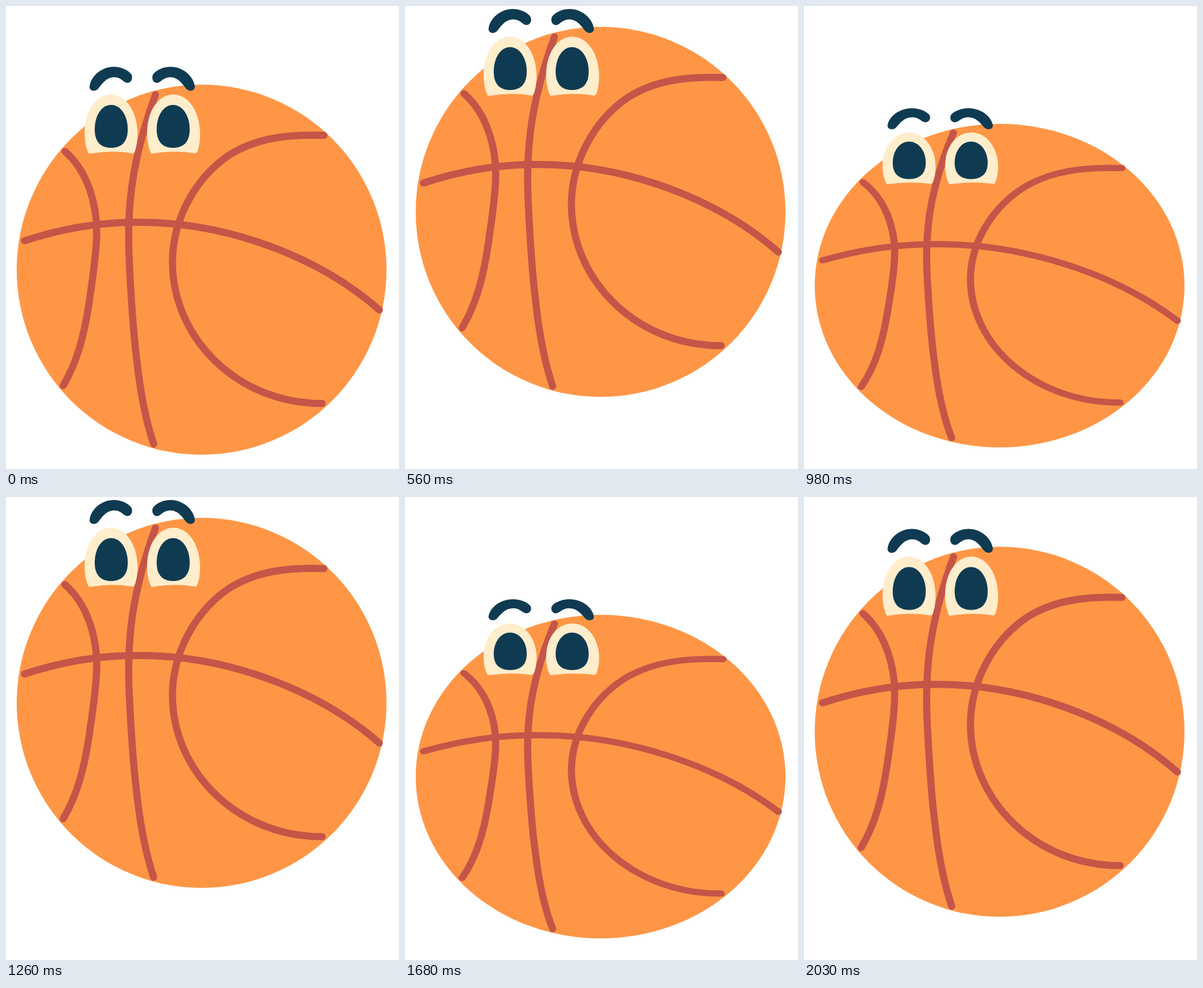
An HTML page that plays this animation: 660 by 777 pixels, repeating every 2100 ms.

```html
<!DOCTYPE html>
<html lang="en">
<head>
<meta charset="utf-8">
<title>Bouncing basketball</title>
<style>
  html, body { margin: 0; width: 100%; height: 100%; overflow: hidden; background: #fff; }
  svg { display: block; width: 100vw; height: 100vh; }
  .seams { fill: none; stroke: #c45548; stroke-width: 12; stroke-linecap: round; stroke-linejoin: round; }
  .white { fill: #ffedcc; }
  .dark { fill: #0f3b52; }
</style>
</head>
<body>
<svg viewBox="0 0 660 777">
  <defs>
    <path id="eye" class="white" d="M139 247.5C134 238 132 225 132 212C132 178 150 148.5 176 148.5C203 148.5 221 180 221 214C221 226 219 238 216 245Q214.5 248 211 247Q177 242 143 247.5Q140 248 139 247.5Z"/>
    <path id="pupil" class="dark" d="M176.5 166C193 166 204.5 185 204.5 207C204.5 228 194 238 176.5 238C159 238 149 228 149 207C149 185 160 166 176.5 166Z"/>
    <path id="brow" class="dark" d="M140.5 134C143 118 160 102 181 102C194 102 205 108 210 114C214 120 211 129 204 129C197 129 194 119 181 119.5C167 120 160 133 155 138.5C150 145 139 143 140.5 134Z"/>
  </defs>
  <g id="ball">
    <circle cx="328.5" cy="442.5" r="310.5" fill="#ff9646"/>
    <g class="seams">
      <path d="M99 244C136 276 155 333 152 392C150 432 144 465 140 495C132 550 120 597 96 637"/>
      <path d="M251 149C236 190 219 245 211 305C206 345 205 390 207 428C210 490 213 540 219 589C225 645 235 697 248 735"/>
      <path d="M534 217C470 215 420 222 375 250C320 287 280 355 279.5 430C280 560 392 668 531 667"/>
      <path d="M31 394C95 373 160 362 225 363C370 363 523 419 627 510"/>
    </g>
    <use href="#eye"/>
    <use href="#eye" x="105"/>
    <use href="#pupil"/>
    <use href="#pupil" x="104"/>
    <use href="#brow"/>
    <use href="#brow" transform="translate(457.5 0) scale(-1 1)"/>
  </g>
</svg>
<script>
  const STEP = 70, STEPS = 10, CENTER = 442.5, RADIUS = 310.5;

  // Step in the bounce, bottom edge of the ball, vertical radius.
  const poses = [
    { at: 0, bottom: 753, ry: RADIUS },
    { at: 3, bottom: 769, ry: 258.5 },
    { at: 7, bottom: 656, ry: RADIUS },
    { at: 8, bottom: 656, ry: RADIUS },
    { at: 10, bottom: 753, ry: RADIUS }
  ];
  const ball = document.getElementById('ball');
  const mix = (a, b, k) => a + (b - a) * k;

  function draw(time) {
    const step = Math.floor(time / STEP) % STEPS;
    const i = poses.findIndex(pose => pose.at > step);
    const from = poses[i - 1], to = poses[i];
    const k = (step - from.at) / (to.at - from.at);
    const ry = mix(from.ry, to.ry, k);
    const cy = mix(from.bottom, to.bottom, k) - ry;
    const scale = ry / RADIUS;
    ball.setAttribute('transform', `matrix(1 0 0 ${scale} 0 ${cy - CENTER * scale})`);
  }

  const start = performance.now();
  function tick() {
    draw(performance.now() - start);
    requestAnimationFrame(tick);
  }
  tick();
</script>
</body>
</html>
```
